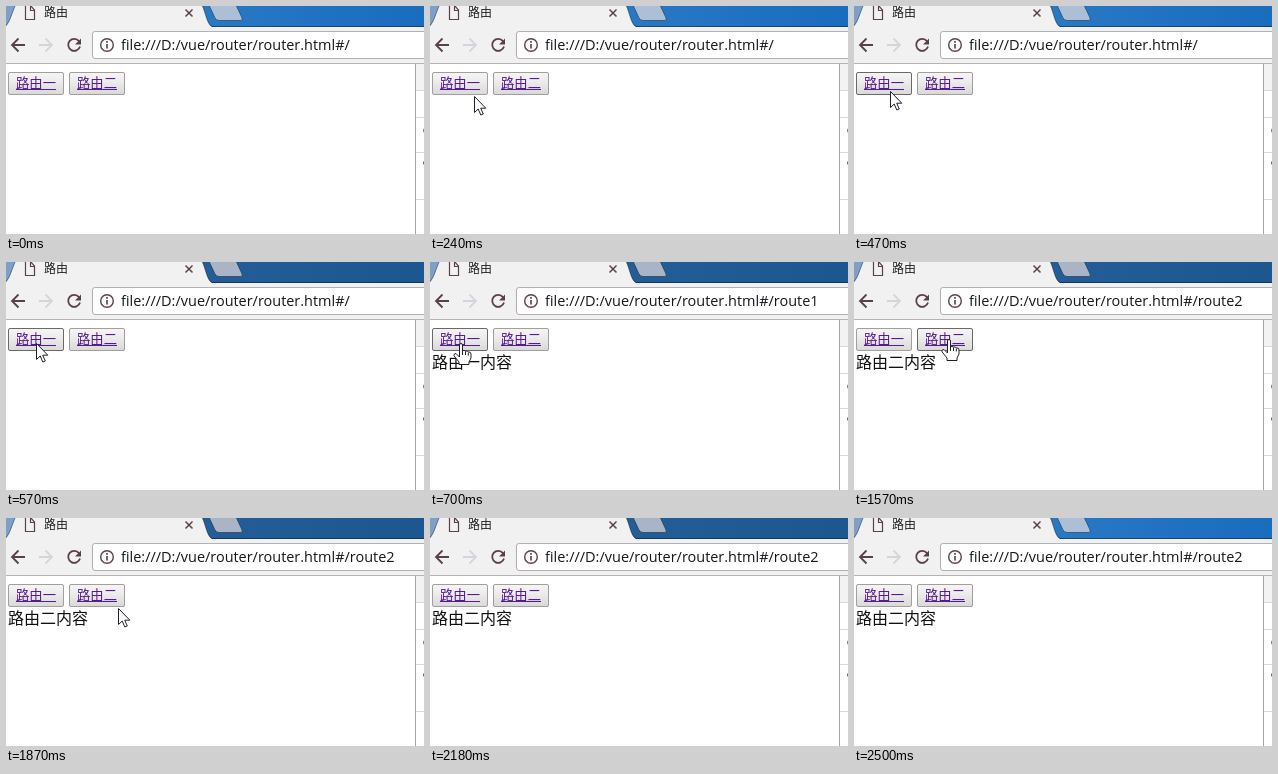
Write an HTML page that moves like this. It is 418 px wide and 228 px high and loops after 2.58 s.

```html
<!DOCTYPE html>
<html lang="zh">
<head>
<meta charset="utf-8">
<title>路由</title>
<style>
  html, body { margin: 0; width: 100%; height: 100%; overflow: hidden; background: #fff; }
  svg { display: block; width: 418px; height: 228px; }
  text { font-family: "Noto Sans CJK SC", "Noto Sans CJK", "Noto Sans CJK JP", sans-serif; }
  #url { font: 14.46px "Open Sans", "Noto Sans", sans-serif; }
  .icon { fill: none; stroke: #5a4048; stroke-width: 1.8; }
  .crisp { shape-rendering: crispEdges; }
</style>
</head>
<body>
<svg viewBox="0 0 418 228">
  <defs>
    <linearGradient id="glass" gradientUnits="userSpaceOnUse" x1="0" x2="418">
      <stop offset="0" stop-color="#7d9fcb"/><stop offset=".03" stop-color="#7d9fcb"/>
      <stop id="glassA" offset=".45"/><stop id="glassB" offset="1"/>
    </linearGradient>
    <linearGradient id="face" x2="0" y2="1">
      <stop offset="0" stop-color="#f5f5f5"/><stop offset=".45" stop-color="#ebebeb"/><stop offset="1" stop-color="#d8d8d8"/>
    </linearGradient>
    <linearGradient id="pressed" x2="0" y2="1">
      <stop offset="0" stop-color="#d4d4d4"/><stop offset="1" stop-color="#ececec"/>
    </linearGradient>
  </defs>

  <rect width="418" height="228" fill="#fff"/>

  <!-- title bar and tab -->
  <rect width="418" height="22" fill="url(#glass)"/>
  <path id="newTab" d="M203 -1 L209 12 Q210.500 14.500 213 14.500 H234.500 Q237 14.500 236 12 L230 -1Z" stroke="#000" stroke-opacity=".4"/>
  <path d="M-1 21 C3 19 6 7 9.500 -1 H196 C200 8 201 18 206 21 H418 V58 H-1Z" fill="#f2f1f2"/>
  <path d="M-1 20.500 C3 18 6 7 9.500 -1 M196 -1 C200 8 201 18 206 20.500 H418" fill="none" stroke="#000" stroke-opacity=".4"/>
  <path d="M19.500 -1 V13.500 H28.500 V4 L24.500 -.5 V4.500 H28.500" class="icon" style="stroke-width:1.2"/>
  <text x="38" y="11" font-size="12" fill="#222">路由</text>
  <path d="M179.500 3.500 l7 7 m0 -7 l-7 7" class="icon" style="stroke-width:1.5"/>

  <!-- toolbar -->
  <path d="M0 57.500 H418" stroke="#b5b2b5" class="crisp"/>
  <path d="M19 39 H6.500 M12.500 32.500 L6 39 L12.500 45.500" class="icon"/>
  <path d="M33 39 H45.500 M39.500 32.500 L46 39 L39.500 45.500" class="icon" style="stroke:#d3d5dc"/>
  <path d="M73 35.200 A6 6 0 1 0 74 40.500" class="icon"/>
  <path d="M75 32.500 V38.500 H69Z" fill="#5a4048"/>
  <rect x="86.500" y="25.500" width="345" height="27" rx="2.500" fill="#fff" stroke="#b3afb3"/>
  <circle cx="101" cy="39" r="6.300" class="icon" style="stroke-width:1.400"/>
  <path d="M101 38 V42.500 M101 35 V36.700" class="icon" style="stroke-width:1.600"/>
  <text id="url" x="115" y="44" fill="#15151c"></text>

  <!-- side panel -->
  <g class="crisp">
    <rect x="410" y="58" width="8" height="27" fill="#f3f3f3"/>
    <path d="M409.500 58 V228" stroke="#a3a3a3"/>
    <path d="M410 84.500 h8 M410 111.500 h8 M410 146.500 h8 M410 193.500 h8" stroke="#d8d8d8"/>
  </g>
  <path d="M419 121 q-3 3.500 0 7 M419 153.500 q-3 3.500 0 7" fill="none" stroke="#444"/>

  <!-- page -->
  <g id="buttons"></g>
  <text id="content" x="2" y="105.800" font-size="16" fill="#111"></text>

  <path id="arrow" d="M.5 .5 V16.500 L4.200 13 L6.800 19 L9.300 18 L6.700 12.200 H11.800Z"
        fill="#fff" stroke="#20202c" stroke-linejoin="round"/>
  <g id="hand" stroke="#20202c" stroke-linejoin="round">
    <path d="M-1.500 14 V2 Q-1.500 .5 0 .5 Q1.500 .5 1.500 2 V8 Q3 6.500 4.500 8.200 Q6.500 7.200 7.300 9 Q10 8.500 10 11 V15 L8 19 V21.500 H-2 V19 L-7 12.800 Q-7.500 10.500 -5 10.500 Z" fill="#fff"/>
    <path d="M1.500 8 v4 M4.500 8.500 v3.500 M7.300 9.500 v3" fill="none"/>
  </g>
</svg>

<script>
const LOOP = 2580;
const FOCUS = [490, 2500];
const $ = id => document.getElementById(id);
const set = (el, attrs) => { for (const k in attrs) el.setAttribute(k, attrs[k]); };

// time, x, y of the pointer tip, and its shape
const pointer = [
  [0, 0, 0, ''],
  [70, 142, 176, 'arrow'],
  [155, 76, 121, 'arrow'],
  [240, 44, 90, 'arrow'],
  [320, 40, 87, 'arrow'],
  [400, 36, 85, 'arrow'],
  [490, 33, 83, 'arrow'],
  [570, 30, 81, 'arrow'],
  [650, 31, 81, 'hand'],
  [870, 40, 80, 'hand'],
  [940, 60, 79, 'arrow'],
  [1010, 82, 78, 'hand'],
  [1090, 95, 77, 'hand'],
  [1870, 112, 90, 'arrow'],
  [1950, 170, 125, 'arrow'],
  [2030, 260, 168, 'arrow'],
  [2110, 376, 212, 'arrow'],
  [2180, 0, 0, '']
];

const routes = [
  [0, '', ''],
  [700, 'route1', '路由一内容'],
  [1570, 'route2', '路由二内容']
];

const buttons = [
  { x: 2, label: '路由一', down: 650, up: 700 },
  { x: 63, label: '路由二', down: 1340, up: 1570 }
];

for (const b of buttons) {
  $('buttons').insertAdjacentHTML('beforeend', `
    <g transform="translate(${b.x} 66)">
      <rect x=".5" y=".5" width="55" height="22" rx="1.5"/>
      <text x="8" y="15.8" font-size="13.33" fill="#551a8b">${b.label}</text>
      <path d="M8 17.5 h40" stroke="#551a8b" class="crisp"/>
    </g>`);
  b.rect = $('buttons').lastElementChild.querySelector('rect');
}

const during = (t, from, to) => t >= from && t < to;
const latest = (steps, t) => steps.filter(s => s[0] <= t).pop();

function draw(t) {
  const [, x, y, shape] = latest(pointer, t);
  for (const id of ['arrow', 'hand'])
    set($(id), { transform: `translate(${x} ${y})`, visibility: shape === id ? 'visible' : 'hidden' });

  for (const b of buttons) {
    const hover = shape && during(x, b.x, b.x + 56) && during(y, 66, 89);
    set(b.rect, {
      fill: during(t, b.down, b.up) ? 'url(#pressed)' : 'url(#face)',
      stroke: hover ? '#6c6868' : '#a39d9b'
    });
  }

  const [, route, text] = latest(routes, t);
  $('url').textContent = 'file:///D:/vue/router/router.html#/' + route;
  $('content').textContent = text;

  const active = during(t, ...FOCUS);
  set($('glassA'), { 'stop-color': active ? '#235e98' : '#2a79c6' });
  set($('glassB'), { 'stop-color': active ? '#1c5790' : '#1a6cbc' });
  set($('newTab'), { fill: active ? '#a9b5c6' : '#acbfd6' });
}

const start = performance.now();
function tick() {
  draw((performance.now() - start) % LOOP);
  requestAnimationFrame(tick);
}
tick();
</script>
</body>
</html>
```
